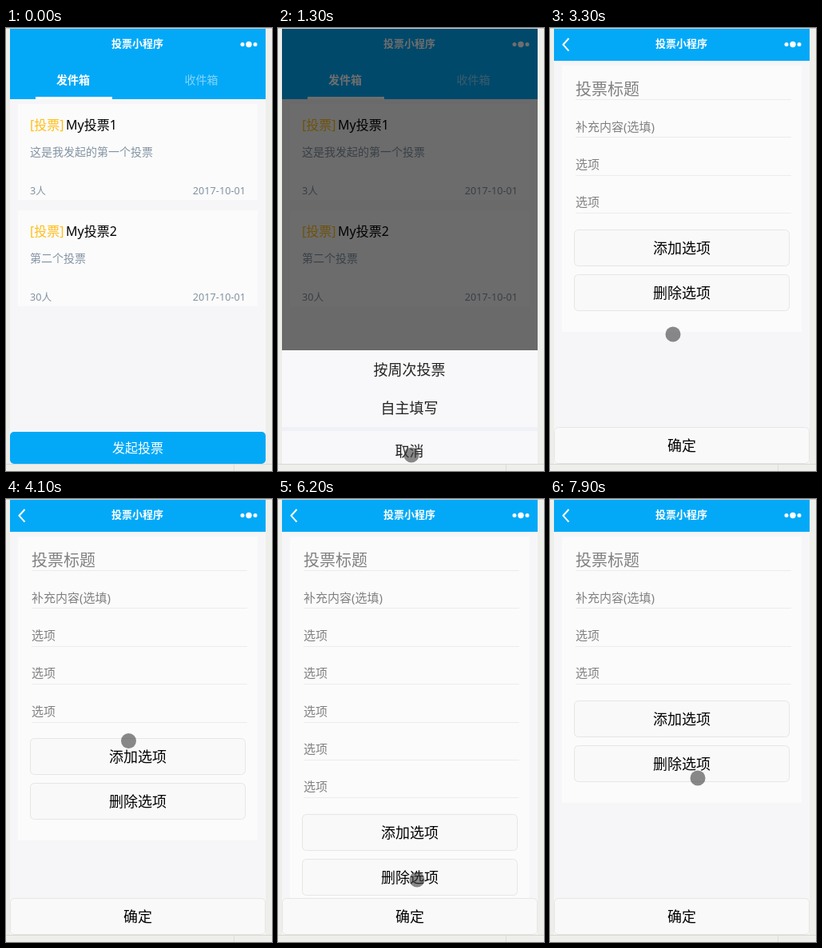
An HTML page for the animation above (8 s loop, 333 by 554 pixels).

```html
<!DOCTYPE html>
<html lang="zh-CN">
<head>
<meta charset="utf-8">
<title>投票小程序</title>
<style>
html, body { margin: 0; width: 100%; height: 100%; overflow: hidden; background: #eeeeea; }
svg { display: block; width: 333px; height: 554px; }
text { font-family: "Noto Sans", "Noto Sans CJK SC", "Noto Sans CJK", sans-serif; }
</style>
</head>
<body>
<svg id="stage" viewBox="0 0 333 554" xmlns="http://www.w3.org/2000/svg"></svg>
<script>
const LOOP = 8000, STEP = 100, ROW = 47.33;
const BLUE = '#03a9f7', PAGE = '#f6f6f9', CARD = '#fbfbfb';

const rect = (x, y, w, h, fill, extra = '') =>
  `<rect x="${x}" y="${y}" width="${w}" height="${h}" fill="${fill}" ${extra}/>`;

// y is the vertical middle of the line
const text = (s, x, y, size, fill, extra = '') =>
  `<text x="${x}" y="${y + size * 0.37}" font-size="${size}" fill="${fill}" ${extra}>${s}</text>`;

const label = (s, x, y, size, fill, extra = '') =>
  text(s, x, y, size, fill, `text-anchor="middle" ${extra}`);

const button = (s, x, y, w) =>
  rect(x + .5, y + .5, w - 1, 45, '#f9f9f9', 'rx="5" stroke="#e6e6e6"') +
  label(s, 165, y + 23, 18, '#000');

const line = y => rect(32, y, 270, 1, '#ececec');

const voteCard = (y, title, note, count) =>
  rect(15, y, 300, 120, CARD) +
  text('[投票]', 30, y + 26.5, 16, '#ffbe1a') +
  text(title, 75, y + 26.5, 16, '#000') +
  text(note, 30, y + 60, 14, '#8393a3') +
  text(count, 30, y + 108, 12.7, '#8393a3') +
  text('2017-10-01', 300, y + 108, 12.7, '#8393a3', 'text-anchor="end"');

const titleField = text('投票标题', 32, 77, 20, '#808080') + line(89);

const optionRow = i =>
  `<g id="opt${i}">` +
  text('选项', 32, 170 + Math.round(i * ROW), 15, '#808080') +
  line(184 + Math.round(i * ROW)) + '</g>';

const listPage =
  rect(5, 1, 320, 544, PAGE) +
  voteCard(95, 'My投票1', '这是我发起的第一个投票', '3人') +
  voteCard(228, 'My投票2', '第二个投票', '30人') +
  rect(5, 505, 320, 40, BLUE, 'rx="5"') +
  label('发起投票', 165, 525, 16, '#fff');

const tabs =
  rect(5, 41, 320, 48, BLUE) +
  label('发件箱', 84, 65, 14, '#fff', 'font-weight="700"') +
  label('收件箱', 244.5, 65, 14, '#fff', 'opacity=".5"') +
  rect(37, 86, 96, 3, '#fff');

const formPage =
  rect(5, 41, 320, 504, PAGE) +
  rect(15, 47, 300, 333, CARD, 'id="panel"') +
  titleField +
  text('补充内容(选填)', 32, 123, 15, '#808080') + line(136) +
  [0, 1, 2, 3, 4].map(optionRow).join('') +
  `<g id="actions">${button('添加选项', 30, 252, 270)}${button('删除选项', 30, 308, 270)}</g>` +
  button('确定', 5, 499, 320);

const header =
  rect(5, 1, 320, 40, BLUE) +
  label('投票小程序', 164.5, 19, 13, '#fff', 'font-weight="700"') +
  '<g fill="#fff"><circle cx="296" cy="20.5" r="2.5"/><circle cx="304" cy="20.5" r="3.7"/><circle cx="312" cy="20.5" r="2.5"/></g>' +
  '<path id="back" d="M23.5 13L16.5 20.8L23.5 28.6" fill="none" stroke="#fff" stroke-width="2"/>';

const sheet =
  rect(5, 403, 320, 142, '#f8f8fa') +
  rect(5, 499, 320, 5, '#f0f1f6') +
  label('按周次投票', 164.5, 427, 18, '#222') +
  label('自主填写', 164.5, 475, 18, '#222') +
  label('取消', 164.5, 529, 18, '#222');

document.getElementById('stage').innerHTML =
  '<clipPath id="phone"><rect x="5" y="1" width="320" height="544"/></clipPath>' +
  rect(0, 0, 333, 554, '#eeeeea') + rect(0, 0, 333, 1, '#cfcfcf') +
  rect(0, 545, 333, 1, '#d8d8d4') + rect(285, 546, 1, 8, '#dcdcd8') +
  '<g clip-path="url(#phone)">' + listPage +
  `<g id="tabs">${tabs}</g>` +
  `<g id="early">${rect(5, 41, 320, 54, PAGE)}${rect(15, 47, 300, 43, CARD)}${titleField}</g>` +
  `<g id="form">${formPage}</g>` + header +
  rect(5, 1, 320, 544, '#000', 'id="mask"') +
  `<g id="sheet">${sheet}</g></g>` +
  '<circle id="dot" r="9.5" fill="#3c3c3c" fill-opacity=".6"/>' +
  '<path id="arrow" d="M0 0V16.2L3.8 12.7L6.4 18.8L9 17.7L6.4 11.8H11.6Z" fill="#fff" stroke="#000"/>';

const $ = id => document.getElementById(id);
const show = (id, on) => $(id).setAttribute('display', on ? 'inline' : 'none');
const move = (id, x, y) => $(id).setAttribute('transform', `translate(${x} ${y})`);
const span = (t, a, b) => Math.min(1, Math.max(0, (t - a) / (b - a)));
const easeOut = (p, power = 3) => 1 - (1 - p) ** power;

// time, x, y of the pointer
const PATH = [
  [100, 319, 62], [300, 272, 190], [600, 180, 440], [800, 148, 528], [900, 167, 534],
  [1400, 167, 534], [1800, 169, 469], [2400, 169, 468], [2800, 162, 471], [3000, 162, 471],
  [3300, 154, 383], [3700, 143, 278], [3900, 143, 278], [4300, 164, 327], [4600, 164, 327],
  [5000, 166, 437], [5100, 166, 437], [5400, 173, 384], [5700, 173, 384], [6200, 174, 476],
  [6500, 174, 476], [6800, 178, 426], [7000, 178, 426], [7300, 182, 378], [7500, 182, 378],
  [7900, 185, 349]
];

function pointer(t) {
  const k = PATH.findIndex(p => p[0] > t);
  if (k < 0) return PATH[PATH.length - 1].slice(1);
  if (k === 0) return PATH[0].slice(1);
  const [a, ax, ay] = PATH[k - 1], [b, bx, by] = PATH[k];
  const p = (t - a) / (b - a);
  return [ax + (bx - ax) * p, ay + (by - ay) * p];
}

function optionCount(t) {
  const passed = times => times.filter(at => t >= at).length;
  return 2 + passed([3900, 4500, 5600]) - passed([6400, 6900, 7400]);
}

function draw(t) {
  const open = easeOut(span(t, 1100, 1300));
  const closed = easeOut(span(t, 2100, 2510), 2);
  $('mask').setAttribute('opacity', 0.57 * open * (1 - span(t, 2100, 2450)));
  move('sheet', 0, Math.round(142 * (1 - open + closed)));

  show('tabs', t < 2400);
  show('back', t >= 2400);
  show('early', t >= 2400);
  show('form', t >= 2500);
  move('form', 320 * (1 - easeOut(span(t, 2400, 3000))), 0);

  const n = optionCount(t), shift = Math.round((n - 2) * ROW);
  for (let i = 0; i < 5; i++) show('opt' + i, i < n);
  move('actions', 0, shift);
  $('panel').setAttribute('height', 333 + shift);

  const [x, y] = pointer(t), loading = t >= 2300 && t < 2600;
  show('dot', t >= 100 && !loading);
  show('arrow', loading);
  move('dot', x, y);
  move('arrow', x + .5, y + .5);
}

const start = performance.now();
function tick() {
  const t = (performance.now() - start) % LOOP;
  draw(Math.floor(t / STEP) * STEP);
  requestAnimationFrame(tick);
}
tick();
</script>
</body>
</html>
```
